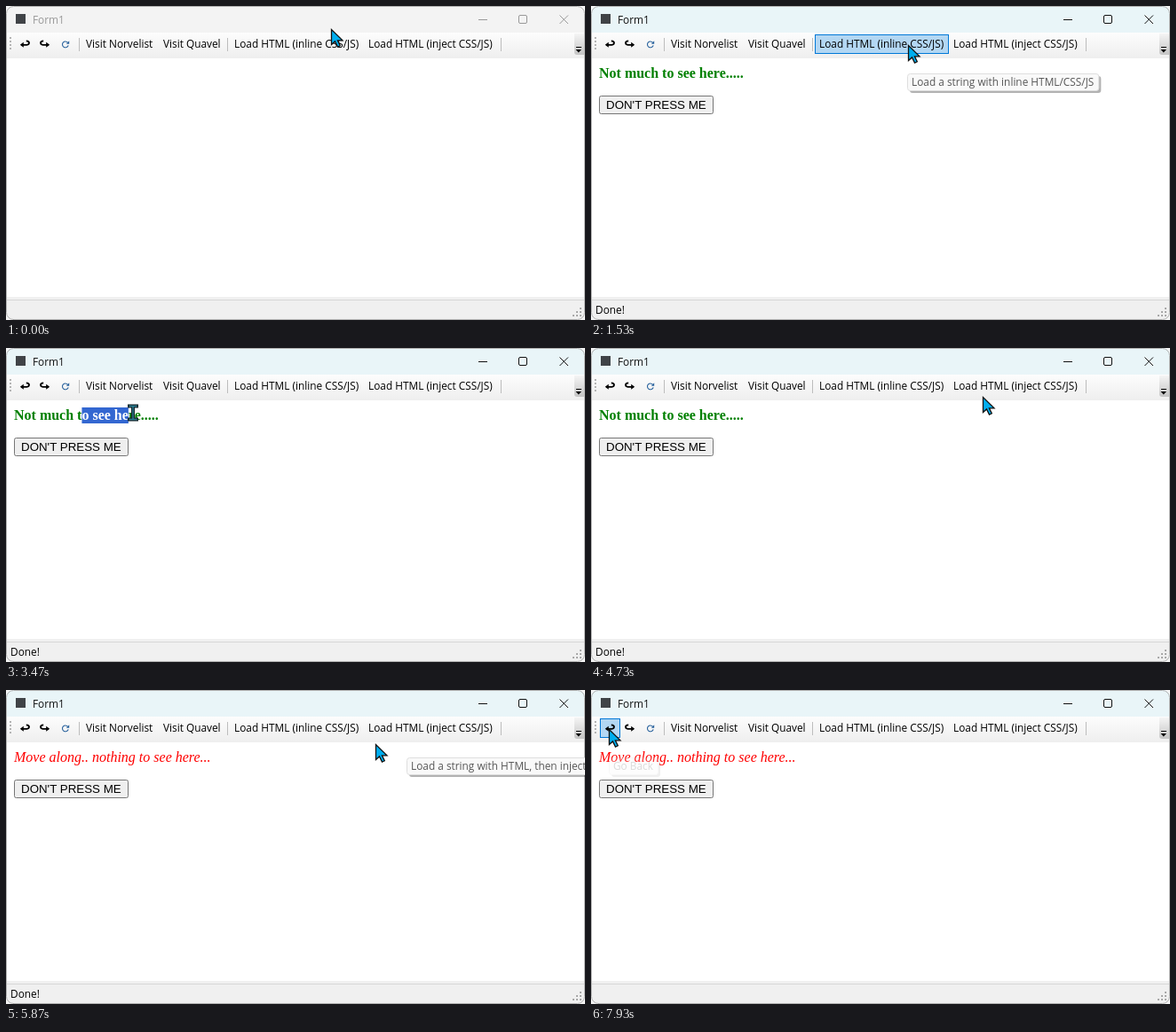
An HTML page for the animation above (8000 ms loop, 652x354 px).

```html
<!DOCTYPE html>
<html lang="en">
<head>
<meta charset="utf-8">
<title>Form1</title>
<style>
  html, body { margin: 0; width: 100%; height: 100%; overflow: hidden; background: #f4f4f4; }
  svg { display: block; width: 652px; height: 354px; }
  text { white-space: pre; }
  .ui { font: 11.85px "Open Sans", "Noto Sans", sans-serif; fill: #000; }
  .page { font: bold 16px "Liberation Serif", serif; }
  .page.second { font-weight: normal; font-style: italic; fill: #f00; }
  .tip text { fill: #575757; }
  #titleBar { fill: #f3f3f3; }
  #caption { fill: #999; }
  #controls { stroke: #999; fill: none; }
  .active #titleBar { fill: #e9f5f8; }
  .active #caption { fill: #111; }
  .active #controls { stroke: #111; }
</style>
</head>
<body>
<svg id="stage" viewBox="0 0 652 354">
  <defs>
    <linearGradient id="barShade" x2="0" y2="1">
      <stop offset="0" stop-color="#fdfdfd"/><stop offset="1" stop-color="#eeeeee"/>
    </linearGradient>
    <linearGradient id="overflowShade" x2="0" y2="1">
      <stop offset="0" stop-color="#f5f5f5"/><stop offset="1" stop-color="#c4c4c4"/>
    </linearGradient>
    <clipPath id="frame"><rect width="652" height="354" rx="8"/></clipPath>
    <clipPath id="selectionClip"><rect id="selectionClipBox" y="67" height="18"/></clipPath>
    <path id="backArrow" d="M17 43.8h6.5q2.5-.3 2.5-2.3t-3.2-2.2" fill="none" stroke="#000" stroke-width="1.8"/>
  </defs>

  <g clip-path="url(#frame)">
    <rect width="652" height="354" fill="#fff"/>
    <rect id="titleBar" width="652" height="30"/>
    <rect x="11" y="9" width="11" height="11" fill="#404347"/>
    <text id="caption" class="ui" x="30" y="20">Form1</text>
    <g id="controls">
      <path d="M532 15.5h10M623.5 10.5l9.5 9.5M633 10.5l-9.5 9.5"/>
      <rect x="577.5" y="10.5" width="9" height="9" rx="1.5"/>
    </g>

    <rect y="30" width="652" height="29" fill="url(#barShade)"/>
    <path d="M640 31h12v24h-9q-3 0-3-3z" fill="url(#overflowShade)"/>
    <path d="M642 46.5h6" stroke="#000"/><path d="M641.5 49h6.5l-3.2 3.4z"/>
    <path d="M5 35v15" stroke="#b4b4b4" stroke-width="2" stroke-dasharray="2"/>
    <path d="M82.5 36v15M249.5 36v15M557.5 36v15" stroke="#bdbdbd"/>
    <rect id="hover" y="32.5" height="21" stroke="#0078d7"/>
    <use href="#backArrow"/><path d="M15.8 43.8l4-3v6z"/>
    <g transform="matrix(-1 0 0 1 65 0)"><use href="#backArrow"/><path d="M15.8 43.8l4-3v6z"/></g>
    <path d="M69.6 41.3a3.4 3.4 0 1 0 .6 3" fill="none" stroke="#27619c" stroke-width="1.1"/>
    <path d="M71.2 39.3v3.4h-3.4z" fill="#27619c"/>
    <g class="ui">
      <text x="90" y="47">Visit Norvelist</text>
      <text x="177" y="47">Visit Quavel</text>
      <text x="257" y="47">Load HTML (inline CSS/JS)</text>
      <text x="408" y="47">Load HTML (inject CSS/JS)</text>
    </g>

    <g id="page">
      <text id="firstLine" class="page" x="9" y="81" fill="#008000">Not much to see here.....</text>
      <g id="selection" clip-path="url(#selectionClip)">
        <rect y="67" width="300" height="18" fill="#3367d1"/>
        <text class="page" x="9" y="81" fill="#fff">Not much to see here.....</text>
      </g>
      <text id="secondLine" class="page second" x="9" y="81">Move along.. nothing to see here...</text>
      <rect x="9.5" y="101.5" width="128" height="20" rx="2" fill="#efefef" stroke="#767676"/>
      <text x="17" y="116" style="font: 13.333px 'Liberation Sans', sans-serif">DON'T PRESS ME</text>
    </g>

    <rect y="328" width="652" height="26" fill="#f0f0f0"/>
    <path d="M0 331.5h652" stroke="#d7d7d7"/>
    <text id="status" class="ui" x="5" y="347">Done!</text>
    <path d="M638 349h10M642 345h6M646 341h2" stroke="#a8a8a8" stroke-width="2" stroke-dasharray="2"/>
    <path d="M8 353.5h395" stroke="#777" stroke-dasharray="7 3 2 5 11 4"/>
  </g>
  <rect x=".5" y=".5" width="651" height="353" rx="8" fill="none" stroke="#b0b0b0"/>

  <g id="tips"></g>
  <path id="arrow" d="M.5.5v17l4-3.6 3 6.2 2.8-1.3-2.9-6h5.6z" fill="#00aeef" stroke="#111" stroke-width="1.3"/>
  <g id="beam" fill="none">
    <path d="M-6-7.5H6M-6 7.5H6M0-8V8" stroke="#14252b" stroke-width="4"/>
    <path d="M-4.5-7.5h9M-4.5 7.5h9M0-7V7" stroke="#2b8296" stroke-width="1.4"/>
  </g>
</svg>
<script>
const LOOP = 8000, TICK = 200 / 3, TICKS = 120;
const $ = id => document.getElementById(id);
const show = (element, visible) => element.style.display = visible ? "" : "none";
const clamp = value => Math.max(0, Math.min(1, value));
const within = (value, from, to) => value >= from && value < to;

// Pointer path: tick, x, y
const path = [
  [0, 366, 26], [6, 357, 44], [32, 357, 44], [38, 180, 86], [44, 84, 76],
  [47, 84, 76], [52, 143, 73], [56, 148, 79], [60, 148, 79], [66, 290, 83],
  [71, 441, 55], [73, 451, 44], [87, 451, 44], [88, 416, 61], [93, 270, 84],
  [97, 212, 80], [99, 212, 80], [100, 197, 82], [109, 46, 61], [112, 22, 50],
  [113, 21, 47], [114, 20, 44]
];
// Toolbar buttons: left edge, width
const buttons = [[10, 23], [252, 151], [403, 151]];
// Ticks while the mouse button is held on the toolbar
const presses = [[19, 22], [74, 76], [117, 119]];

function makeTip(label, x, fadeIn, fadeOut) {
  const group = document.createElementNS("http://www.w3.org/2000/svg", "g");
  group.setAttribute("class", "tip ui");
  group.innerHTML = `<rect x="${x + 3}" y="79" height="19" rx="3" fill="#000" opacity=".3"/>
    <rect x="${x + .5}" y="76.5" height="19" rx="3" fill="#f9f9f9" stroke="#dedede"/>
    <text x="${x + 5}" y="90">${label}</text>`;
  $("tips").append(group);
  const width = group.querySelector("text").getComputedTextLength() + 10;
  group.querySelectorAll("rect").forEach(box => box.setAttribute("width", width));
  return { group, fadeIn, fadeOut };
}
const tips = [
  makeTip("Load a string with inline HTML/CSS/JS", 356, 9, 33),
  makeTip("Load a string with HTML, then inject CSS/JS", 451, 78, 88),
  makeTip("Go Back", 20, 118.3, TICKS)
];

function pointerAt(tick) {
  const next = path.findIndex(key => key[0] > tick);
  if (next < 0) return path.at(-1).slice(1);
  const [t0, x0, y0] = path[next - 1], [t1, x1, y1] = path[next];
  const k = (tick - t0) / (t1 - t0);
  return [x0 + (x1 - x0) * k, y0 + (y1 - y0) * k];
}

// Right edge of the last whole character before x
function snapToCharacter(x) {
  const line = $("firstLine");
  let edge = 9;
  for (let i = 1; i <= line.textContent.length; i++) {
    const end = 9 + line.getSubStringLength(0, i);
    if (end <= x) edge = end;
  }
  return edge;
}

function draw(tick) {
  const [x, y] = pointerAt(tick);
  const second = tick >= 77;
  const overText = within(y, 66, 86) && x < (second ? 230 : 172);
  $("stage").classList.toggle("active", tick >= 9);

  const button = within(y, 32, 54) && buttons.find(([left, width]) => within(x, left, left + width));
  show($("hover"), button);
  if (button) {
    $("hover").setAttribute("x", button[0] + .5);
    $("hover").setAttribute("width", button[1] - 1);
    $("hover").setAttribute("fill", presses.some(p => within(tick, ...p)) ? "#80bceb" : "#b3d7f3");
  }

  show($("page"), tick >= 23);
  show($("firstLine"), !second);
  show($("secondLine"), second);
  show($("status"), within(tick, 23, 76) || within(tick, 78, 119));

  const selecting = within(tick, 48, 61);
  show($("selection"), selecting);
  if (selecting) {
    const start = snapToCharacter(86);
    $("selectionClipBox").setAttribute("x", start);
    $("selectionClipBox").setAttribute("width", Math.max(0, snapToCharacter(x) - start));
  }

  for (const { group, fadeIn, fadeOut } of tips)
    group.style.opacity = clamp((tick - fadeIn + 1) / 4) * clamp(1 - (tick - fadeOut) / 3) * (fadeIn > 118 ? .5 : 1);

  show($("arrow"), !overText);
  show($("beam"), overText);
  $(overText ? "beam" : "arrow").setAttribute("transform", `translate(${Math.round(x)} ${Math.round(y)})`);
}

const start = performance.now();
function animate() {
  const time = (performance.now() - start) % LOOP;
  draw(Math.floor(time / TICK + .1) % TICKS);
  requestAnimationFrame(animate);
}
animate();
</script>
</body>
</html>
```
